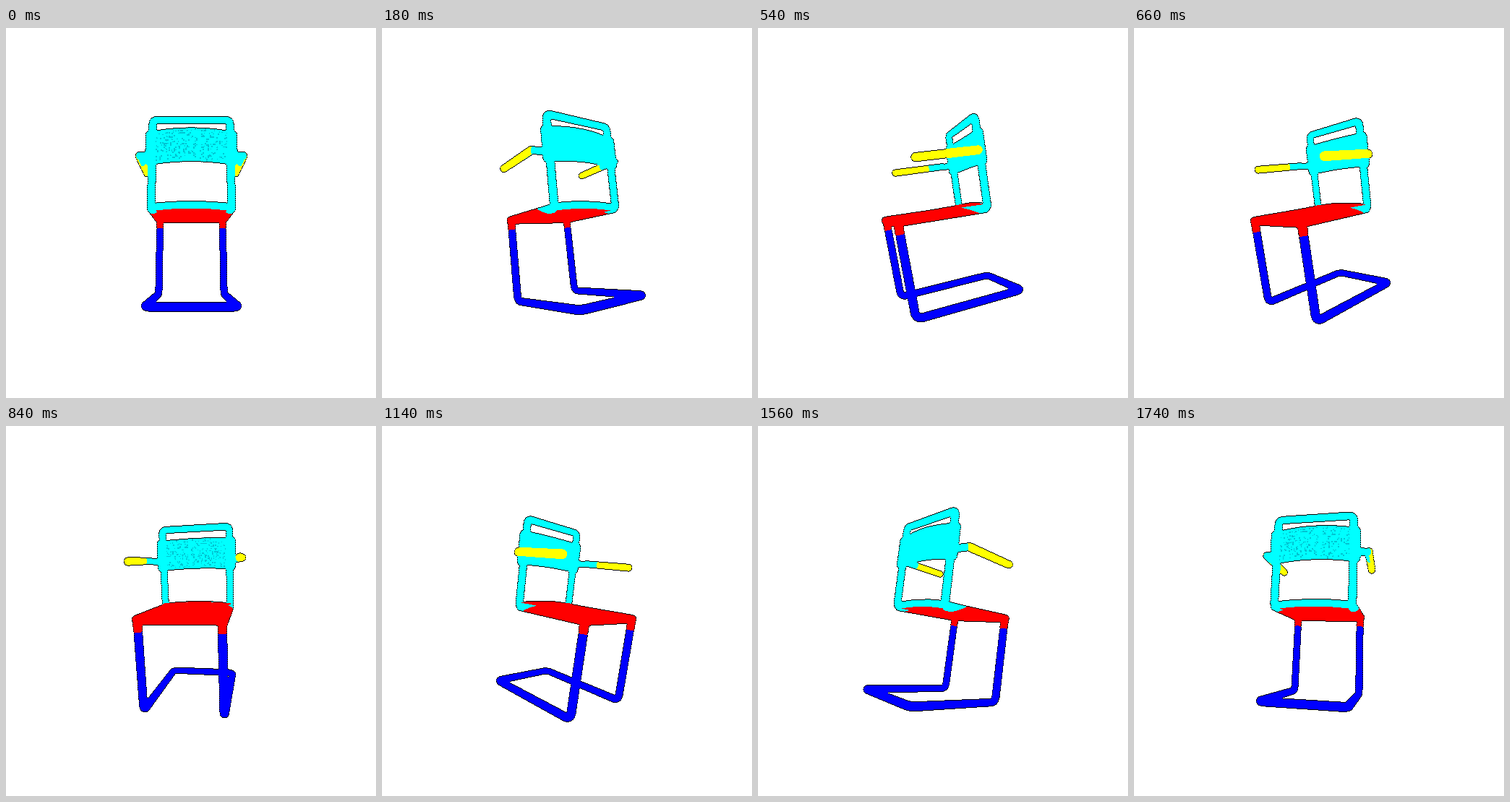
Animation, 512 px wide and 512 px high, one loop 1.8 s. Source, as an HTML page with a canvas:

```html
<!DOCTYPE html>
<html lang="en">
<head>
<meta charset="utf-8">
<title>Rotating chair</title>
<style>
  html, body { margin: 0; width: 100%; height: 100%; overflow: hidden; background: #fff; }
  canvas { display: block; width: 100vw; height: 100vh; }
</style>
</head>
<body>
<canvas id="stage" width="512" height="512"></canvas>
<script>
const SIZE = 512, CENTER = 256, CAMERA = 420;
const STEP_MS = 60, STEPS = 30;
const SPLAT = 0.8; // screen pixels added to every radius

// Colours packed as ABGR
const WHITE = 0xffffffff, BLACK = 0xff000000, CYAN = 0xffffff00, SHADE = 0xffd2c400;
const RED = 0xff0000ff, BLUE = 0xffff0000, YELLOW = 0xff00ffff;

// Points are [x: sideways, y: down, f: towards the front of the seat]
const balls = [];
const lerp = (a, b, t) => a + (b - a) * t;
const mix = (p, q, t) => p.map((v, i) => lerp(v, q[i], t));
const dist = (p, q) => Math.hypot(...p.map((v, i) => v - q[i]));
const flip = ([x, y, f]) => [-x, y, f];
const mirrored = half => [...half, ...half.slice().reverse().map(flip)];
const addBall = ([x, y, f], r, paint) => balls.push({ x, y, f, r, paint });

function roundCorners(points, radius) {
  const out = [points[0]];
  for (let i = 1; i < points.length - 1; i++) {
    const p = points[i];
    const a = mix(p, points[i - 1], radius / dist(p, points[i - 1]));
    const b = mix(p, points[i + 1], radius / dist(p, points[i + 1]));
    for (let t = 0; t <= 1; t += 0.125) out.push(mix(mix(a, p, t), mix(p, b, t), t));
  }
  out.push(points[points.length - 1]);
  return out;
}

function tube(points, r, paint, corner = 0) {
  const line = corner ? roundCorners(points, corner) : points;
  for (let i = 1; i < line.length; i++) {
    const n = Math.max(1, Math.ceil(dist(line[i - 1], line[i])));
    for (let k = 0; k <= n; k++) addBall(mix(line[i - 1], line[i], k / n), r, paint);
  }
}

function pair(points, r, paint, corner) {
  tube(points, r, paint, corner);
  tube(points.map(flip), r, paint, corner);
}

function sheet(cols, rows, r, paint, point) {
  for (let j = 0; j <= rows; j++)
    for (let i = 0; i <= cols; i++) addBall(point(2 * i / cols - 1, j / rows), r, paint());
}

let seed = 7;
const random = () => (seed = seed * 16807 % 2147483647) / 2147483647;

const solid = color => () => color;
const cyan = solid(CYAN), red = solid(RED), blue = solid(BLUE);
const speckle = (f, inner, ny, facing) => facing > 0.85 ? SHADE : CYAN;
const railPaint = (f, inner, ny) => f < -20 - 13 * ny ? CYAN : RED;
const armPaint = (f, inner, ny) => f < 4 && inner + 0.3 * ny > 0.15 ? CYAN : YELLOW;
const frameDepth = y => -43 + (-6.5 - y) * 18 / 115;

// Base and legs
tube(mirrored([[50.5, 27, 68.5], [50.5, 124.5, 50], [50, 101, -92]]), 4.8, blue, 9);
pair([[50.8, 10.5, 71.5], [50.5, 22, 69.5]], 5, red);

// Seat
tube(mirrored([[50, -6, -39], [52.5, 10.5, 73.5]]), 5, railPaint, 6);
sheet(50, 55, 3.6, () => red, (u, v) =>
  [49 * u, lerp(-8, 10, v) - 2 * (1 - u * u) * (1 - v), lerp(-38, 72, v)]);
tube([-46, -23, 0, 23, 46].map(x => [x, -11 + 2.5 * (x / 46) ** 2, -42]), 4.1, cyan);

// Back frame, panel and sleeves
tube(mirrored([[50, -5.5, -36], [50, -6.5, -43], [50, -121.5, -25]]), 4.7, cyan, 6.5);
sheet(62, 25, 2.3, () => random() < 0.16 ? speckle : cyan, (u, v) => {
  const y = lerp(-103.5, -64.5, v), arch = 1 - u * u;
  return [50 * u, y - 3 * arch, frameDepth(y) - 6 * arch];
});
pair([-101, -67].map(y => [52, y, frameDepth(y)]), 6.5, cyan);

// Arms
pair([[52, -75, -28], [67, -75, -24]], 4.4, cyan);
pair([[68.5, -75.5, -21], [69.5, -62.5, 55]], 4.8, armPaint);

const ctx = document.getElementById("stage").getContext("2d");
const image = ctx.createImageData(SIZE, SIZE);
const pixels = new Uint32Array(image.data.buffer);
const color = new Uint32Array(SIZE * SIZE);
const depth = new Float32Array(SIZE * SIZE);

function drawBall(ball, sin, cos) {
  const z = -sin * ball.x - cos * ball.f;
  const scale = CAMERA / (CAMERA - z);
  const cx = CENTER + (cos * ball.x - sin * ball.f) * scale;
  const cy = CENTER + ball.y * scale;
  const r = ball.r * scale + SPLAT, side = Math.sign(ball.x);
  for (let y = Math.ceil(cy - r); y <= cy + r; y++) {
    for (let x = Math.ceil(cx - r); x <= cx + r; x++) {
      const nx = (x - cx) / r, ny = (y - cy) / r, rest = 1 - nx * nx - ny * ny;
      if (rest < 0) continue;
      const nz = Math.sqrt(rest), at = y * SIZE + x, near = z + nz * ball.r;
      if (near <= depth[at]) continue;
      depth[at] = near;
      color[at] = ball.paint(ball.f, -side * (cos * nx - sin * nz), ny, Math.abs(cos));
    }
  }
}

// Edges against the background are dark: solid above and below, dotted at the sides
function isOutline(i) {
  if (color[i] === WHITE) return false;
  if (color[i - SIZE] === WHITE || color[i + SIZE] === WHITE) return true;
  const dotted = Math.floor(i / SIZE) % 3 > 0;
  return dotted && (color[i - 1] === WHITE || color[i + 1] === WHITE);
}

function draw(step) {
  const angle = step / STEPS * 2 * Math.PI;
  const sin = Math.sin(angle), cos = Math.cos(angle);
  depth.fill(-1000);
  color.fill(WHITE);
  for (const ball of balls) drawBall(ball, sin, cos);
  for (let i = 0; i < pixels.length; i++) pixels[i] = isOutline(i) ? BLACK : color[i];
  ctx.putImageData(image, 0, 0);
}

let shown = -1;
function tick() {
  const step = Math.floor(performance.now() / STEP_MS) % STEPS;
  if (step !== shown) draw(shown = step);
  requestAnimationFrame(tick);
}
tick();
</script>
</body>
</html>
```
